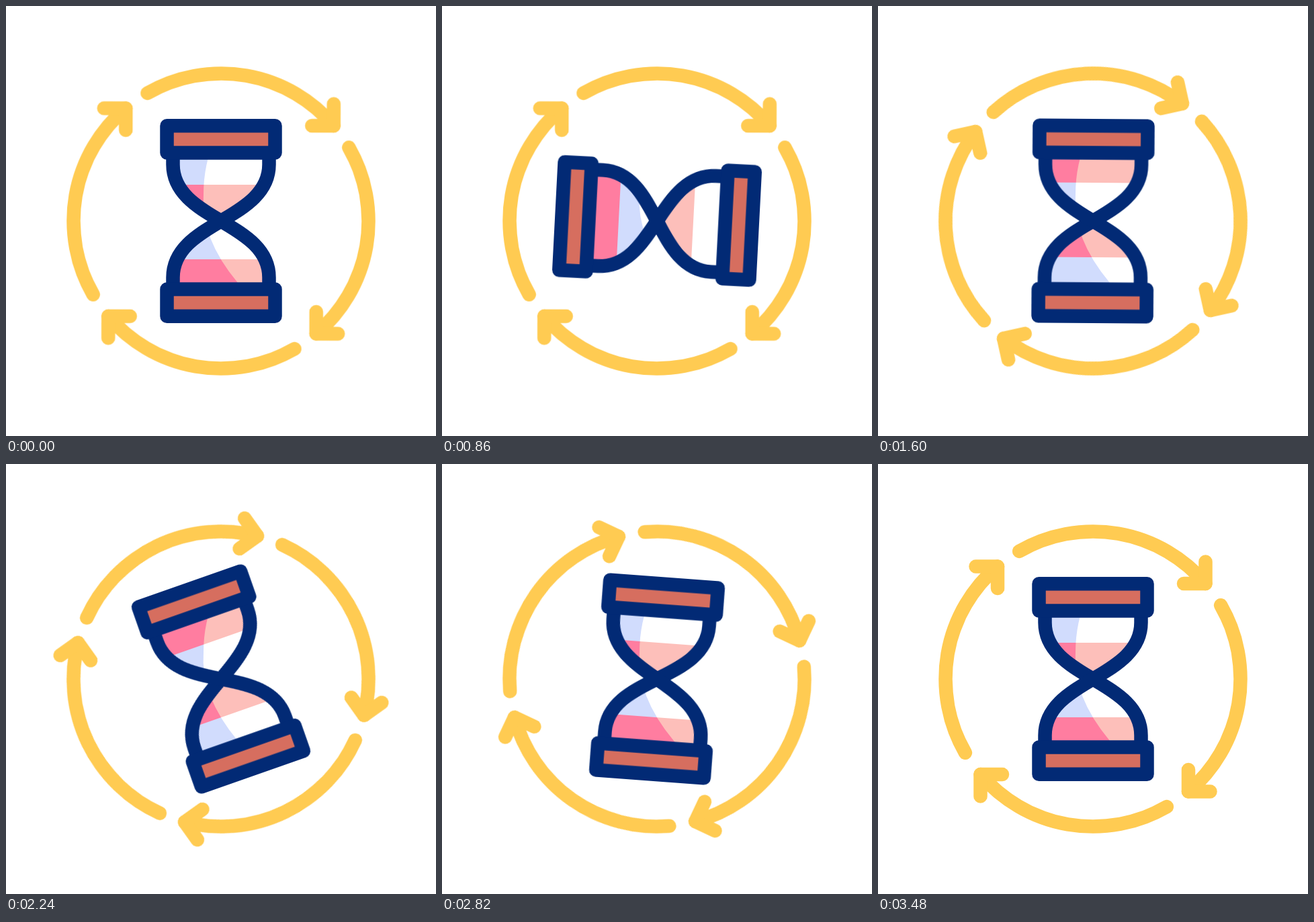
Write an HTML page that moves like this. It is 640 px wide and 640 px high and loops after 3600 ms.

```html
<!DOCTYPE html>
<html lang="en">
<head>
<meta charset="utf-8">
<title>Hourglass</title>
<style>
  html, body { margin: 0; width: 100%; height: 100%; overflow: hidden; background: #fff; }
  svg { display: block; width: 100vw; height: 100vh; }
  .spin { transform-box: view-box; transform-origin: 320px 320px; }
  .line { stroke-width: 20.5; stroke-linecap: round; stroke-linejoin: round; }
  .lit { --glass: #fff; --sand: #fdbfba; }
  .shaded { --glass: #d1dcfd; --sand: #ff7da0; }
</style>
</head>
<body>
<svg viewBox="0 0 640 640">
  <defs>
    <path id="chamber" d="M248.5 218V236C248.5 280 290 302 320 320C350 302 391.5 280 391.5 236V218Z"/>
    <clipPath id="inside">
      <use href="#chamber"/>
      <use href="#chamber" transform="rotate(180 320 320)"/>
    </clipPath>
    <clipPath id="shade">
      <path d="M130 130H345L312 195Q294 235 294 280Q289 345 345 412L370 445V510H130Z"/>
    </clipPath>
    <g id="contents" clip-path="url(#inside)">
      <rect x="230" y="210" width="180" height="220" style="fill:var(--glass)"/>
      <path d="M230 266H410V320H230ZM230 377H410V430H230Z" style="fill:var(--sand)"/>
    </g>
    <g id="arrow">
      <path d="M210.2 129.9A219.5 219.5 0 0 1 487.5 178"/>
      <path d="M487.5 145.5V178H455"/>
    </g>
    <g id="half">
      <path d="M248.5 218V236C248.5 280 290 302 320 320C350 302 391.5 280 391.5 236V218" fill="none"/>
      <rect x="239.5" y="178.2" width="161" height="40.3" fill="#d66e5f"/>
    </g>
  </defs>

  <g id="ring" class="spin line" fill="none" stroke="#ffcb52">
    <use href="#arrow"/>
    <use href="#arrow" transform="rotate(90 320 320)"/>
    <use href="#arrow" transform="rotate(180 320 320)"/>
    <use href="#arrow" transform="rotate(270 320 320)"/>
  </g>

  <g class="lit"><g class="spin glass"><use href="#contents"/></g></g>
  <g class="shaded" clip-path="url(#shade)"><g class="spin glass"><use href="#contents"/></g></g>
  <g class="spin glass line" stroke="#022a75">
    <use href="#half"/>
    <use href="#half" transform="rotate(180 320 320)"/>
  </g>
</svg>
<script>
  const LOOP = 3600;

  // steps: [time in ms, angle in degrees]
  function spin(selector, steps, easing) {
    const frames = steps.map(([time, angle]) => ({
      offset: time / LOOP, transform: `rotate(${angle}deg)`, easing
    }));
    for (const el of document.querySelectorAll(selector)) {
      el.animate(frames, { duration: LOOP, iterations: Infinity });
    }
  }

  // Wind back, swing past the half turn, settle.
  const swing = [[80, 0], [494, -20], [1215, 200], [1636, 180]];
  const again = swing.map(([time, angle]) => [time + 1724, angle + 180]);

  spin('#ring', [[0, 0], [3440, 360], [LOOP, 360]], 'linear');
  spin('.glass', [[0, 0], ...swing, ...again, [LOOP, 360]], 'cubic-bezier(.3333, 0, .6667, 1)');
</script>
</body>
</html>
```
